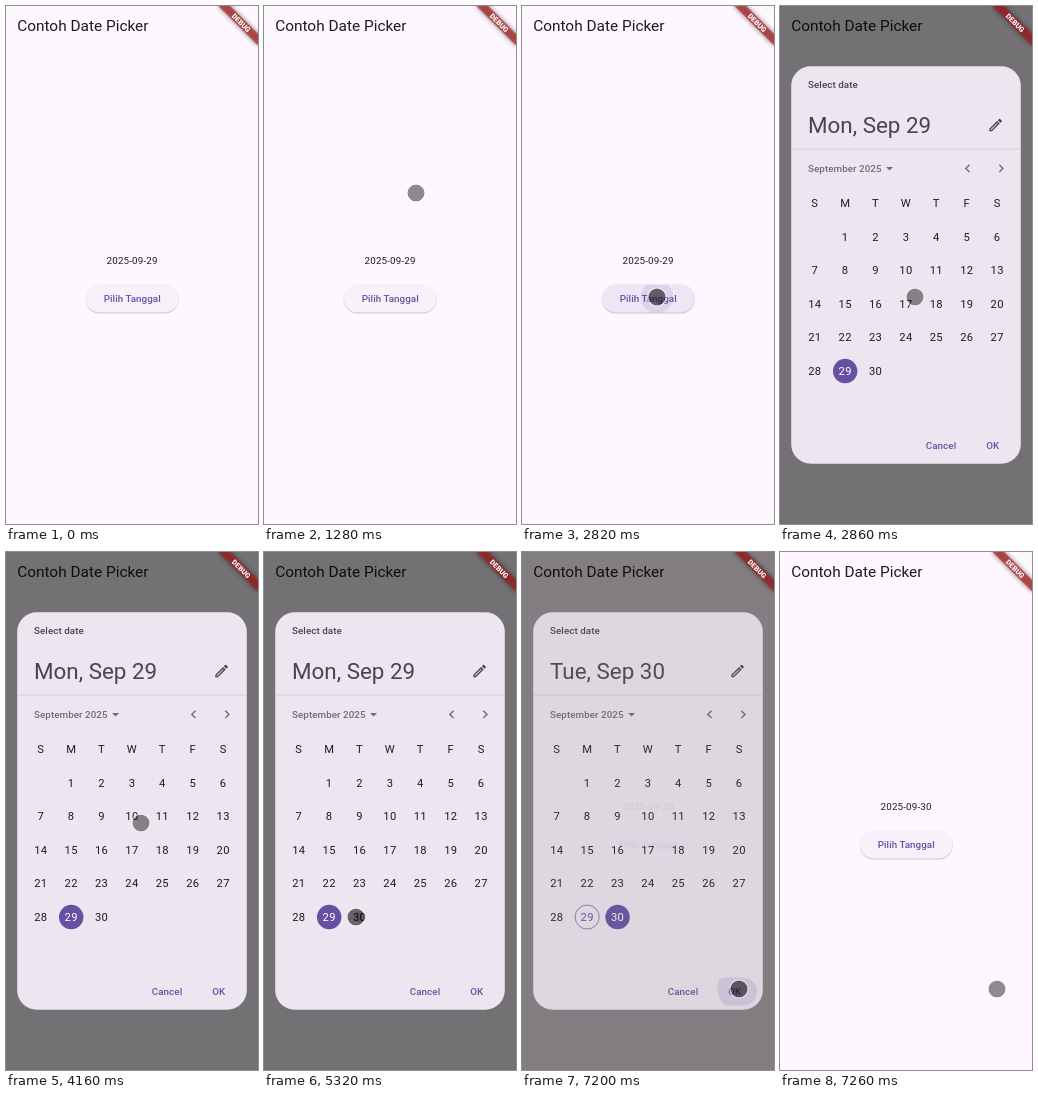
These frames come from a looping animation (252 px wide and 518 px high, 7760 ms). An HTML page:

```html
<!DOCTYPE html>
<html lang="id">
<head>
<meta charset="utf-8">
<title>Contoh Date Picker</title>
<style>
  html, body { margin: 0; height: 100%; overflow: hidden; background: #fef7ff; }
  svg { display: block; width: 100vw; height: 100vh; font-family: Roboto, sans-serif; }
  .button { fill: #f7f2fa; filter: drop-shadow(0 1px 1px rgba(0, 0, 0, .27)); }
  .shadow { filter: blur(4px); }
</style>
</head>
<body>
<!-- One unit is a device-independent pixel: the stage is 360 x 740 units. -->
<svg viewBox="0 0 360 740">
  <defs>
    <clipPath id="pill"><rect x="113.8" y="398" width="133" height="40" rx="20"/></clipPath>
    <clipPath id="okPill"><rect x="272" y="608" width="64" height="40" rx="20"/></clipPath>
  </defs>
  <g id="page">
    <rect class="button" x="113.8" y="398" width="133" height="40" rx="20"/>
    <g id="press" clip-path="url(#pill)" fill="#6750a4">
      <rect x="113" y="398" width="134" height="40" opacity=".07"/>
      <circle cx="193" cy="416" r="23" opacity=".12"/>
    </g>
  </g>
  <rect id="barrier" width="360" height="740"/>
  <g id="dialog">
    <rect x="16" y="86" width="328" height="568" rx="28" fill="#ece6f0"/>
    <path d="M16 204.5H344" stroke="#cac4d0"/>
    <circle id="selected" cy="521.5" r="17.5" fill="#6750a4"/>
    <circle id="today" cx="93.1" cy="521.5" r="17.2" fill="none" stroke="#6750a4"/>
    <circle id="dayRipple" cx="136.6" cy="521.5" fill="#6750a4"/>
    <g id="okPress" clip-path="url(#okPill)"><circle cx="310" cy="624" r="31" fill="#6750a4" opacity=".16"/></g>
    <path transform="translate(296 158)" fill="#49454f" d="M14.06 9.02l.92.92L5.92 19H5v-.92l9.06-9.06M17.66 3c-.25 0-.51.1-.7.29l-1.83 1.83 3.75 3.75 1.83-1.83c.39-.39.39-1.02 0-1.41l-2.34-2.34c-.2-.2-.45-.29-.71-.29zm-3.6 3.19L3 17.25V21h3.75L17.81 9.94z"/>
    <g fill="#706c73">
      <path transform="translate(144.5 220)" d="M7 10l5 5 5-5z"/>
      <path transform="translate(256 220)" d="M15.41 7.41L14 6l-6 6 6 6 1.41-1.41L10.83 12z"/>
      <path transform="translate(304 220)" d="M10 6L8.59 7.41 13.17 12l-4.58 4.59L10 18l6-6z"/>
    </g>
  </g>
  <g id="banner" transform="translate(360 0) rotate(45)">
    <rect class="shadow" x="-40" y="28" width="80" height="12" opacity=".5"/>
    <rect x="-40" y="28" width="80" height="12" fill="#b71c1c" opacity=".63"/>
  </g>
  <g id="cursor">
    <circle id="cursorFill" r="12.3"/>
    <circle r="13.1" fill="none" stroke="#fff" stroke-width="1.7" opacity=".5"/>
  </g>
</svg>
<script>
const LOOP = 7760;
const INK = '#1d1b20', MUTED = '#49454f', PRIMARY = '#6750a4';
const $ = id => document.getElementById(id);

// Adds text whose capitals are vertically centred on y.
function label(parent, text, x, y, size, fill, { anchor = 'middle', weight = 400, spacing = 0 } = {}) {
  const node = document.createElementNS('http://www.w3.org/2000/svg', 'text');
  const attributes = {
    x, y: y + size * 0.356, fill, 'font-size': size, 'font-weight': weight,
    'text-anchor': anchor, 'letter-spacing': spacing
  };
  for (const name in attributes) node.setAttribute(name, attributes[name]);
  node.textContent = text;
  $(parent).append(node);
  return node;
}

const start = { anchor: 'start' };
const medium = { weight: 500, spacing: 0.1 };
const mediumStart = { ...medium, ...start };

label('page', 'Contoh Date Picker', 16, 28, 22, INK, start);
const dateText = label('page', '', 180.2, 364, 14, INK, { spacing: 0.25 });
label('page', 'Pilih Tanggal', 180.3, 418.5, 14, PRIMARY, medium);
label('banner', 'DEBUG', 0, 34, 10.2, '#fff', { weight: 900 });

label('dialog', 'Select date', 40, 112.3, 14, MUTED, mediumStart);
const headline = label('dialog', '', 40, 170, 32, MUTED, start);
label('dialog', 'September 2025', 40, 232, 14, '#706c73', mediumStart);
label('dialog', 'Cancel', 230, 628.5, 14, PRIMARY, medium);
label('dialog', 'OK', 304, 628.5, 14, PRIMARY, medium);

const columnX = column => 49.7 + column * 304 / 7;
const dayStyle = { spacing: 0.5 };
[...'SMTWTFS'].forEach((name, i) => label('dialog', name, columnX(i), 281.5, 16, INK, dayStyle));
const days = [];
for (let day = 1; day <= 30; day++) {
  days[day] = label('dialog', day, columnX(day % 7), 329.5 + 48 * Math.floor(day / 7), 16, INK, dayStyle);
}

// Pointer stops in stage pixels: [ms, x, y].
const stops = [
  [760, 262, 185], [1280, 152, 187], [1620, 152, 187], [1940, 135, 291],
  [3540, 135, 291], [3680, 135, 265], [4140, 135, 265], [4160, 135, 271],
  [4780, 92, 365], [5840, 92, 365], [6380, 217, 437], [LOOP, 217, 437]
];

function pointerAt(t) {
  const next = Math.max(1, stops.findIndex(stop => stop[0] > t));
  const [t0, x0, y0] = stops[next - 1], [t1, x1, y1] = stops[next];
  const p = Math.max(0, (t - t0) / (t1 - t0));
  const eased = p * p * (3 - 2 * p);
  return [x0 + (x1 - x0) * eased, y0 + (y1 - y0) * eased];
}

const within = (t, from, to) => t >= from && t < to;
const show = (id, visible) => $(id).setAttribute('visibility', visible ? 'inherit' : 'hidden');
const set = (id, name, value) => $(id).setAttribute(name, value);

function draw(t) {
  const picked = t >= 5400;
  const closing = t >= 7200;
  const lastStep = t >= 7220;

  dateText.textContent = closing ? '2025-09-30' : '2025-09-29';
  headline.textContent = picked ? 'Tue, Sep 30' : 'Mon, Sep 29';
  set('selected', 'cx', columnX(picked ? 2 : 1));
  show('today', picked);
  days[29].setAttribute('fill', picked ? PRIMARY : '#fff');
  days[30].setAttribute('fill', picked ? '#fff' : INK);

  const open = within(t, 2860, 7260);
  show('barrier', open);
  show('dialog', open);
  set('barrier', 'opacity', lastStep ? 0.25 : closing ? 0.49 : 0.54);
  set('dialog', 'opacity', lastStep ? 0.35 : closing ? 0.86 : 1);

  const ripple = (t - 5320) / 200;
  show('dayRipple', within(t, 5320, 5520));
  set('dayRipple', 'r', 8 + 12 * Math.min(1, Math.max(0, ripple)));
  set('dayRipple', 'opacity', Math.max(0, 0.2 * (1 - ripple)));
  show('press', within(t, 2820, 2860));
  show('okPress', closing);

  const pressed = within(t, 2820, 2860) || within(t, 5320, 5400) || within(t, 7200, 7260);
  const [x, y] = pointerAt(t);
  show('cursor', t >= 780);
  set('cursor', 'transform', `translate(${x / 0.7} ${y / 0.7})`);
  set('cursorFill', 'opacity', pressed ? 0.56 : 0.44);
}

let origin;
function tick(now) {
  origin ??= now;
  draw((now - origin) % LOOP);
  requestAnimationFrame(tick);
}
draw(0);
requestAnimationFrame(tick);
</script>
</body>
</html>
```
